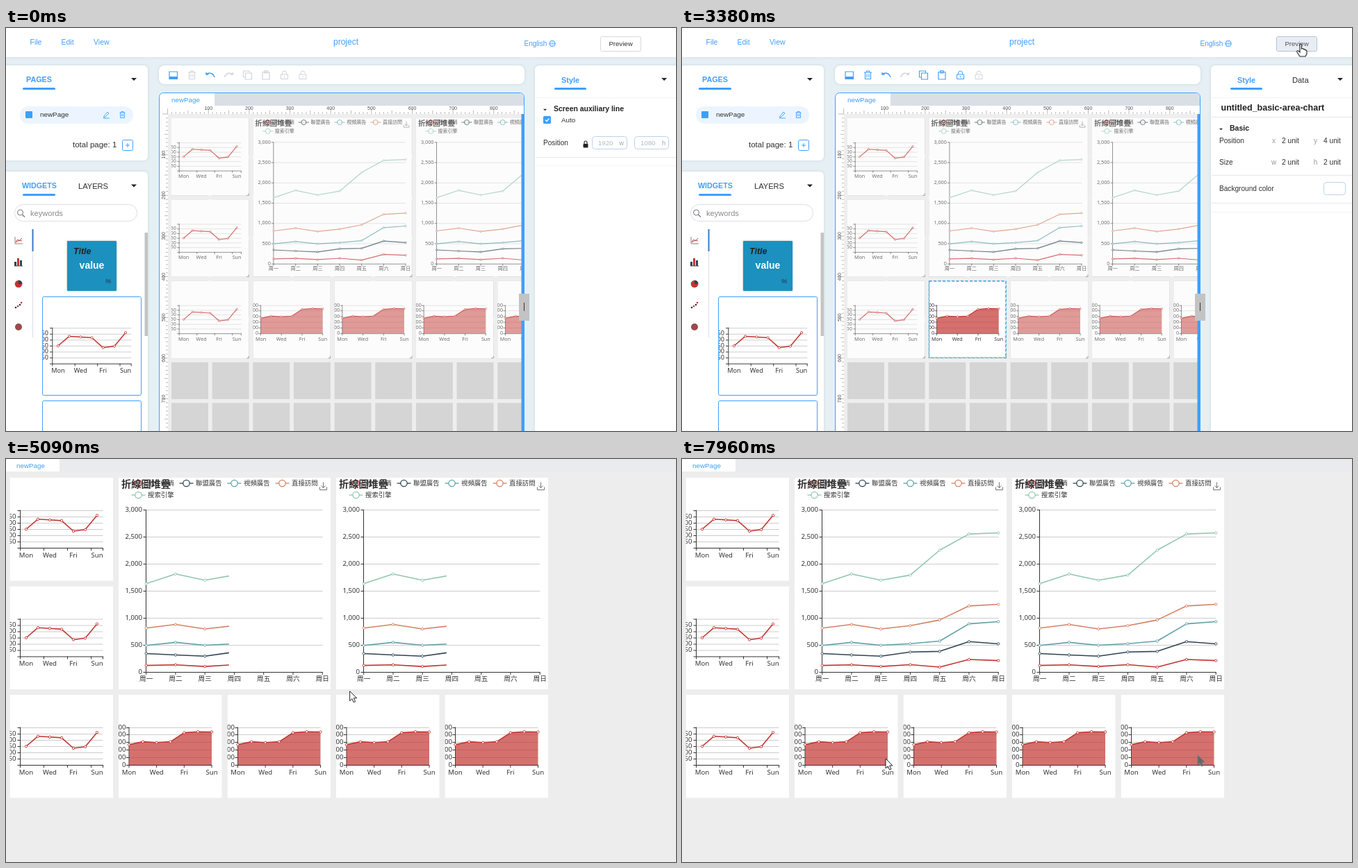
Write an HTML page with a canvas that moves like this. It is 964x581 px and loops after 8 s.

```html
<!DOCTYPE html>
<html lang="en">
<head>
<meta charset="utf-8">
<style>
html, body { margin: 0; width: 100%; height: 100%; overflow: hidden; background: #fff; }
canvas { display: block; }
</style>
</head>
<body>
<canvas id="stage" width="964" height="581"></canvas>
<script>
const g = document.getElementById('stage').getContext('2d');
const LOOP = 8000, BLUE = '#409eff', INK = '#303133', OFF = '#d0d3d8';
const UI = '"Liberation Sans", Arial, sans-serif';
const CHART = '"Noto Sans", "Noto Sans CJK TC", "Noto Sans CJK SC", sans-serif';
const COLORS = ['#c23531', '#2f4554', '#61a0a8', '#d48265', '#91c7ae'];
const NAMES = ['郵件營銷', '聯盟廣告', '視頻廣告', '直接訪問', '搜索引擎'];
const DAYS = ['Mon', '', 'Wed', '', 'Fri', '', 'Sun'];
const WEEK = [...'一二三四五六日'].map(d => '周' + d);
const WEEKLY = [150, 230, 224, 218, 135, 147, 260];
const SERIES = [
  [120, 132, 101, 134, 90, 230, 210],
  [220, 182, 191, 234, 290, 330, 310],
  [150, 232, 201, 154, 190, 330, 410],
  [320, 332, 301, 334, 390, 330, 320],
  [820, 932, 901, 934, 1290, 1330, 1320]
];
const STACKED = SERIES.map((_, k) =>
  WEEK.map((_, i) => SERIES.slice(0, k + 1).reduce((sum, s) => sum + s[i], 0)));
// kind, column, row
const CARDS = [
  ['line', 0, 0], ['line', 0, 2], ['line', 0, 4], ['stack', 2, 0], ['stack', 6, 0],
  ['area', 2, 4], ['area', 4, 4], ['area', 6, 4], ['area', 8, 4]
];
const MOVING = CARDS[5];
const CELL = 58.65, VIEW_CELL = 78.25, GX = 238, GY = 130;
// time, x, y
const PATH = [
  [70, 905, 172], [400, 640, 400], [600, 480, 560], [840, 384, 420], [940, 384, 420],
  [1000, 394, 476], [1250, 330, 504], [1400, 289, 485], [1680, 384, 422], [1830, 384, 422],
  [2210, 434, 370], [2600, 876, 18], [2680, 876, 18], [3000, 552, 310], [3380, 890, 23],
  [3700, 890, 23], [4470, 506, 336], [4700, 506, 336], [5320, 488, 334], [5470, 488, 334],
  [6250, 287, 233], [6330, 287, 233], [6600, 560, 200], [6850, 700, 230], [7100, 955, 420],
  [7170, 955, 420], [7400, 742, 427], [7750, 145, 425], [7960, 293, 432]
];

const clamp = v => Math.max(0, Math.min(1, v));

function cursorAt(t) {
  const i = PATH.findIndex(p => p[0] > t);
  if (i < 0) return PATH[PATH.length - 1].slice(1);
  if (i === 0) return null;
  const [t0, x0, y0] = PATH[i - 1], [t1, x1, y1] = PATH[i], k = (t - t0) / (t1 - t0);
  return [x0 + (x1 - x0) * k, y0 + (y1 - y0) * k];
}

function text(s, x, y, size, color = INK, align = 'left', style = '', family = UI) {
  g.font = `${style} ${size}px ${family}`;
  g.fillStyle = color;
  g.textAlign = align;
  g.textBaseline = 'middle';
  g.fillText(s, x, y + .5);
}
const label = (s, x, y, align = 'center', size = 9.6, color = '#333', style = '') =>
  text(s, x, y, size, color, align, style, CHART);

function rect(x, y, w, h, fill, r = 0, stroke) {
  g.beginPath();
  g.roundRect(x, y, w, h, r);
  if (fill) { g.fillStyle = fill; g.fill(); }
  if (stroke) { g.strokeStyle = stroke; g.lineWidth = 1; g.stroke(); }
}
function line(x0, y0, x1, y1, color, w = 1) {
  g.beginPath();
  g.moveTo(x0, y0);
  g.lineTo(x1, y1);
  g.strokeStyle = color;
  g.lineWidth = w;
  g.stroke();
}
function dot(x, y, r, fill, stroke, w = 1) {
  g.beginPath();
  g.arc(x, y, r, 0, 7);
  if (fill) { g.fillStyle = fill; g.fill(); }
  if (stroke) { g.strokeStyle = stroke; g.lineWidth = w; g.stroke(); }
}
function shape(d, x, y, fill, stroke, w = 1, flip = 1) {
  const p = new Path2D(d);
  g.save();
  g.translate(x, y);
  g.scale(flip, 1);
  if (fill) { g.fillStyle = fill; g.fill(p); }
  if (stroke) { g.strokeStyle = stroke; g.lineWidth = w; g.stroke(p); }
  g.restore();
}
const caret = (x, y, s = 4) => shape(`M${-s} ${-s / 2}H${s}L0 ${s / 2}Z`, x, y, '#222');
function panel(x, y, w, h, r = 6) {
  g.save();
  g.shadowColor = 'rgba(90,120,140,.2)';
  g.shadowBlur = 4;
  rect(x, y, w, h, '#fff', r);
  g.restore();
}

function plot(pts, color, reveal, base) {
  g.save();
  g.beginPath();
  g.rect(-5, 0, 10 + 300 * reveal, 310);
  g.clip();
  g.beginPath();
  pts.forEach(p => g.lineTo(...p));
  g.strokeStyle = color;
  g.lineWidth = 1.6;
  g.lineJoin = 'round';
  g.stroke();
  if (base) {
    g.lineTo(pts[6][0], base);
    g.lineTo(pts[0][0], base);
    g.fillStyle = 'rgba(194,53,49,.7)';
    g.fill();
  }
  pts.forEach(p => dot(...p, 1.7, '#fff', color, .9));
  g.restore();
}

function axes(x0, x1, y0, y1, steps, format, labelX, ticks) {
  for (let i = 0; i <= steps; i++) {
    const y = Math.round(y1 - (y1 - y0) * i / steps) + .5;
    if (i) line(x0, y, x1, y, '#ccc');
    line(x0 - 4, y, x0, y, '#333');
    label(format(i), labelX, y - 1, 'right');
  }
  line(x0, y0, x0, y1 + .5, '#333');
  line(x0, y1 + .5, x1, y1 + .5, '#333');
  ticks.forEach(x => line(x, y1, x, y1 + 4, '#333'));
}

function smallChart(kind, reveal) {
  const area = kind === 'area', x0 = 15, x1 = 134, y0 = 46.5, y1 = 101;
  const data = area ? SERIES[4] : WEEKLY, max = area ? 1500 : 300;
  const px = i => area ? x0 + i * (x1 - x0) / 6 : x0 + (i + .5) * (x1 - x0) / 7;
  const ticks = area ? [0, 2, 4, 6].map(px) : [0, 2, 4, 6, 7].map(i => x0 + 17 * i);
  const format = area ? i => i ? (i * 300).toLocaleString('en-US') : '0'
                      : i => i % 6 ? String(i * 50) : '';
  axes(x0, x1, y0, y1, area ? 5 : 6, format, area ? 10.5 : 9, ticks);
  DAYS.forEach((d, i) => d && label(d, px(i), 111.5));
  plot(data.map((v, i) => [px(i), y1 + .5 - (y1 - y0) * v / max]), COLORS[0], reveal, area && y1);
}

const stackX = i => 39.7 + i * 42.25, stackY = v => 280 - v * .078;

function stackChart(reveal) {
  NAMES.forEach((n, i) => {
    const x = 18.5 + i % 4 * 69, y = i < 4 ? 8 : 25;
    line(x, y, x + 20, y, COLORS[i], 1.3);
    dot(x + 10, y, 4.7, '#fff', COLORS[i], 1.3);
    label(n, x + 23.5, y - .5, 'left', 9.4);
  });
  label('折線圖堆疊', 4, 9.5, 'left', 14.2, '#333', 'bold');
  shape('M-5 1V5H5V1M0-6V2M-3-1L0 2L3-1', 294.5, 12.5, null, '#777', 1);
  axes(39.5, 293.5, 46, 280, 6, i => (i * 500).toLocaleString('en-US'), 34, WEEK.map((_, i) => stackX(i)));
  WEEK.forEach((d, i) => label(d, stackX(i), 289.5));
  STACKED.forEach((s, k) => plot(s.map((v, i) => [stackX(i), stackY(v)]), COLORS[k], reveal));
}

function card(kind, x, y, scale, alpha = 1, bg = '#fff', reveal = 1) {
  const size = kind === 'stack' ? 305 : 148.7;
  g.save();
  g.translate(x, y);
  g.scale(scale, scale);
  g.beginPath();
  g.rect(0, 0, size, size);
  g.clip();
  g.fillStyle = bg;
  g.fill();
  g.globalAlpha = alpha;
  kind === 'stack' ? stackChart(reveal) : smallChart(kind, reveal);
  g.restore();
}

function tooltip(mx, my) {
  const i = Math.max(0, Math.min(6, Math.round((mx - 39.7) / 42.25)));
  line(stackX(i), 46, stackX(i), 280, '#888', .8);
  STACKED.forEach((s, k) => dot(stackX(i), stackY(s[i]), 4.2, '#fff', COLORS[k], 1.2));
  const w = 88, h = 106;
  const x = mx + 23 + w > 305 ? mx - 20 - w : mx + 23;
  const y = my + 20 + h > 305 ? my - 19 - h : my + 20;
  rect(x, y, w, h, 'rgba(50,50,50,.7)', 3);
  label(WEEK[i], x + 3.5, y + 12, 'left', 10.6, '#fff');
  NAMES.forEach((n, k) => {
    const ty = y + 28.7 + k * 16.4;
    dot(x + 8, ty + .5, 4, COLORS[k]);
    label(`${n}: ${SERIES[k][i]}`, x + 15, ty, 'left', 10.5, '#fff');
  });
}

function header(cursor) {
  panel(0, 0, 964, 42, 0);
  text('File', 34.5, 20.5, 10.5, BLUE);
  text('Edit', 79.5, 20.5, 10.5, BLUE);
  text('View', 126, 20.5, 10.5, BLUE);
  text('project', 489, 20.5, 12, BLUE, 'center');
  text('English', 745.5, 22.5, 10, BLUE);
  dot(786, 22.5, 4.3, null, BLUE, .9);
  shape('M-4 0H4M0-4V4M-2-4Q-4 0-2 4M2-4Q4 0 2 4', 786, 22.5, null, BLUE, .6);
  const over = cursor && cursor[0] > 855 && cursor[0] < 914 && cursor[1] > 12 && cursor[1] < 33;
  rect(855.5, 12.5, 58, 21, over ? '#e8edf4' : '#fff', 2, over ? '#b9c3d0' : '#d5d8de');
  text('Preview', 884.5, 22.5, 9.6, over ? '#555' : INK, 'center');
  return over;
}

function leftSide() {
  panel(-6, 54, 210, 137);
  text('PAGES', 29, 74.5, 10.8, BLUE, 'left', 'bold');
  rect(24, 86, 47, 3, BLUE, 1.5);
  caret(184, 74);
  rect(20, 113, 163, 25, '#ecf5ff', 12);
  rect(28, 120, 10, 10, BLUE, 1);
  text('newPage', 49, 125, 9.9);
  shape('M-3 2L2-4L4-2L-1 3L-3.500 4ZM-4 5H5', 144, 125, null, BLUE, .9);
  shape('M-4-3H4M-3-3V4.500H3V-3M-1.500-3V-4.500H1.500V-3M-1-1V2.500M1-1V2.500', 167.500, 125, null, BLUE, .9);
  text('total page: 1', 96, 168.5, 11.5);
  rect(167.5, 161.5, 15, 15, '#fff', 2, BLUE);
  shape('M-3 0H3M0-3V3', 175, 169, null, BLUE);

  panel(-6, 207, 210, 390);
  text('WIDGETS', 23, 228, 10.7, BLUE, 'left', 'bold');
  rect(24, 239, 47, 3, BLUE, 1.5);
  text('LAYERS', 104, 228, 11.1);
  caret(184, 227.5);
  rect(12.5, 254.5, 176, 24, '#fff', 12, '#dcdfe6');
  dot(20.5, 266, 4, null, '#777');
  line(23.5, 269, 27, 272.5, '#777', 1.2);
  text('keywords', 35, 267.5, 11.1, '#888');

  line(38.5, 290, 38.5, 446, '#dcdfe6');
  line(38.5, 290, 38.5, 322, '#3a78c0', 2);
  shape('M-5-5V5H6', 18, 306, null, '#888');
  shape('M-4 2L-1-1L1 1L5-3M-4 3L1 0L5 1', 18, 306, null, COLORS[0], .9);
  [[12, 6], [16, 11], [20, 8]].forEach(([x, h], i) => rect(x, 343 - h, 3, h, i % 2 ? COLORS[0] : '#2f4554'));
  rect(12, 342.5, 12, 1, '#444');
  dot(18, 369, 5.3, COLORS[0]);
  shape('M0 0V-5.500A5.500 5.500 0 0 1 5.500 0Z', 18, 369, '#2f4554');
  [[14, 403], [17, 401], [20, 399], [22, 396]].forEach(([x, y], i) => dot(x, y, 1.3, i % 2 ? COLORS[0] : '#333'));
  dot(18, 431, 5, '#9c4a4a');

  g.save();
  g.shadowColor = 'rgba(0,0,0,.3)';
  g.shadowBlur = 3;
  rect(88, 307, 71, 72, '#1c90bf', 1);
  g.restore();
  text('Title', 97, 322, 12.5, '#222', 'left', 'italic bold');
  text('value', 123.5, 343, 14, '#fff', 'center', 'bold');
  text('%', 147, 364.5, 9.5, '#234', 'center', 'italic');
  card('line', 52.5, 387.5, .953);
  rect(52.5, 387.5, 142, 142, null, 2, BLUE);
  rect(52.5, 537.5, 142, 142, '#fff', 2, BLUE);
  rect(199.5, 295, 4.5, 149, '#c4c4c4');
}

function toolbar(active) {
  panel(220, 54, 526, 27, 8);
  const on = active ? BLUE : OFF, y = 68;
  shape('M-5.500-5H6V5.500H-5.500Z', 240.500, y, null, BLUE, 1.2);
  shape('M-5.500 2H6V5.500H-5.500Z', 240.500, y, BLUE);
  shape('M-5.500-4H5.500M-4-4V5.500H4V-4M-2-4V-6H2V-4M-1.500-1.500V3M1.500-1.500V3', 267.500, y, null, on, 1.1);
  const turn = 'M-6-1C-3-4 4-4 6 3M-6-4V-1H-2.500';
  shape(turn, 294, y, null, BLUE, 1.4);
  shape(turn, 320.5, y, null, OFF, 1.3, -1);
  shape('M-3-3H6V6H-3ZM-3 3H-6V-6H3V-3', 347.500, y, null, on, 1.1);
  shape('M-5-4.500H5V6H-5ZM-2-6.500H2V-3H-2Z', 374, y, null, on, 1.2);
  const lock = 'M-5-1H5V5.500H-5ZM-3-1V-3A3 3 0 0 1 3-3';
  shape(lock + 'V-1M0 1V3.500', 400.500, y, null, on);
  shape(lock + 'M0 1V3.500', 427, y, null, OFF);
}

function rulers() {
  for (let k = 0; k < 90; k++) {
    const p = k * CELL / 10, long = k % 10 ? (k % 5 ? 3 : 5) : 8;
    if (p < 510) line(232.6 + p, 124, 232.6 + p, 124 - long, '#aaa', .8);
    if (p < 457) line(233, 124 + p, 233 - long, 124 + p, '#aaa', .8);
    if (k === 0 || k % 10) continue;
    text(k * 10, 232.6 + p, 116, 7, '#555', 'center');
    g.save();
    g.translate(226.5, 124 + p);
    g.rotate(-Math.PI / 2);
    text(k * 10, 0, 0, 7, '#555', 'center');
    g.restore();
  }
}

function dashed(x, y) {
  g.setLineDash([4, 2.5]);
  rect(x, y, 111, 111, null, 0, '#35a7d3');
  rect(x + .5, y + .5, 110, 110, null, 0, '#35a7d3');
  g.setLineDash([]);
}

function workspace(active, drag, unit) {
  rect(220.5, 93.5, 525, 500, '#fff', 6, BLUE);
  rect(300, 94, 445, 18, '#dadfe6', [0, 5, 0, 0]);
  text('newPage', 258.5, 103.5, 9.9, BLUE, 'center');
  rulers();
  g.save();
  g.beginPath();
  g.rect(233, 124, 509, 457);
  g.clip();
  rect(233, 124, 509, 457, '#eee');
  for (let c = 0; c < 9; c++)
    for (let r = 0; r < 8; r++) rect(GX + c * CELL, GY + r * CELL, 53, 53, '#d5d5d5');
  for (const item of CARDS) {
    const [kind, c, r] = item, x = GX + c * CELL, y = GY + r * CELL;
    const picked = active && item === MOVING;
    if (picked && drag) continue;
    card(kind, x, y, .7495, picked ? 1 : .7, picked ? '#fff' : '#fcfcfc');
    const e = (kind === 'stack' ? 4 : 2) * CELL - 9;
    shape('M3 0V3H0', x + e, y + e, null, '#999', .9);
    if (picked) dashed(x, y);
  }
  if (drag) {
    rect(GX + unit[0] * CELL, GY + unit[1] * CELL, 111, 111, 'rgba(150,185,210,.8)');
    card('area', ...drag, .7495, .8, '#fafcfd');
    dashed(...drag);
  }
  g.restore();
  rect(741.5, 124, 4, 457, BLUE);
  rect(738, 383, 15, 39, '#c3c3c3');
  line(745.5, 396, 745.5, 408, '#333');
}

function inspector(active, unit) {
  panel(761, 54, 210, 540, 6);
  text('Style', 799, 75, 10.9, BLUE, 'left', 'bold');
  rect(789, 86, 46, 3, BLUE, 1.5);
  caret(947, 74);
  const rule = (y, c = '#e4e7ed') => line(762, y + .5, 964, y + .5, c);
  rule(100, '#f0f2f5');
  if (!active) {
    caret(775.5, 118, 2.5);
    text('Screen auxiliary line', 788, 116.5, 10.45, '#222', 'left', 'bold');
    rect(773, 127, 11, 11, BLUE, 1.5);
    shape('M-2.500 0L-.5 2L3-2', 778.500, 132.500, null, '#fff', 1.3);
    text('Auto', 799, 133, 9.8);
    text('Position', 773, 166, 10.1);
    rect(830.5, 167, 7, 5.5, '#222', 1);
    shape('M-2 0V-2A2 2 0 0 1 2-2V0', 834, 167, null, '#222', 1.1);
    [[843.5, 50, '1920', 'w'], [904.5, 49, '1080', 'h']].forEach(([x, w, value, unitName]) => {
      rect(x, 156.5, w, 18, '#fff', 4, '#b9d3ee');
      text(value, x + 8.5, 166, 9.6, '#b5b8be');
      text(unitName, x + 42, 166, 9.6, '#a5a8ae', 'center');
    });
    rule(186);
    rule(198, '#f3f5f7');
    return;
  }
  text('Data', 878, 75, 11.2);
  text('untitled_basic-area-chart', 775.5, 115.5, 12.5, '#222', 'left', 'bold');
  rule(128);
  caret(775.5, 146, 2.5);
  text('Basic', 788, 144.5, 10.5, '#222', 'left', 'bold');
  const row = (name, y, fields) => {
    text(name, 773, y, 10.1);
    fields.forEach(([k, v], i) => {
      text(k, 851.5 + i * 60, y, 10, '#999', 'center');
      text(v + ' unit', 863 + i * 60, y, 10.2);
    });
  };
  row('Position', 162.5, [['x', unit[0]], ['y', unit[1]]]);
  row('Size', 194, [['w', 2], ['h', 2]]);
  rule(212);
  text('Background color', 773, 232, 10.1);
  rect(923.5, 222.5, 31, 18, '#fff', 4, '#b9d3ee');
  rule(252);
  rule(265, '#f3f5f7');
}

const ARROW = 'M0 0V14L3.300 11L5.600 16L8 15L5.700 10H10Z';
const arrow = (x, y, fill = '#fff', edge = '#222') => shape(ARROW, x, y, fill, edge, 1);
function moveCursor(x, y, pressed) {
  if (pressed) dot(x, y, 10, 'rgba(250,220,40,.85)');
  shape('M0-8.500L3-5.500H1V-1H5.500V-3L8.500 0L5.500 3V1H1V5.500H3L0 8.500L-3 5.500H-1V1H-5.500V3L-8.500 0L-5.500-3V-1H-1V-5.500H-3Z',
    x, y, pressed ? '#ffe95c' : '#fff', pressed ? '#5d5200' : '#222');
}
const hand = (x, y) =>
  shape('M-1 1Q0-1 1.500 1V7Q4 5.500 4.500 8Q6.500 7 7 9Q9 8.500 9 11V14L7 18H-1L-5 12Q-6 9-3 10L-1 12Z', x, y, '#fff', '#222', 1.1);

function editor(t, cursor) {
  const active = t >= 940;
  let drag = null, unit = [2, 4];
  if (active && t < 1700) {
    drag = [cursor[0] - 384 + GX + 2 * CELL + .5, cursor[1] - 420 + GY + 4 * CELL + .5];
    unit = [Math.max(0, Math.round((drag[0] - GX) / CELL)), Math.round((drag[1] - GY) / CELL)];
  }
  rect(0, 0, 964, 581, '#e6f0f4');
  const over = header(cursor);
  leftSide();
  toolbar(active);
  workspace(active, drag, unit);
  inspector(active, unit);
  if (!cursor) return;
  const [x, y] = cursor;
  if (over) hand(x, y);
  else if (x > 238 && x < 738 && y > 130 && y < 476 || drag) moveCursor(x, y, t > 800 && t < 1700);
  else arrow(x, y);
}

function viewer(t, cursor) {
  const reveal = clamp((t - 4850) / 470), veil = 1 - clamp((t - 4780) / 150);
  rect(0, 0, 964, 581, '#ededed');
  rect(0, 0, 964, 18, '#e9ebef');
  rect(0, 0, 77, 18, '#fff');
  text('newPage', 15, 9.5, 9.8, BLUE);
  const [mx, my] = cursor;
  if (t > 4780) {
    for (const [kind, c, r] of CARDS) card(kind, 5.5 + c * VIEW_CELL, 27 + r * VIEW_CELL, 1, 1, '#fff', reveal);
    for (const c of [2, 6]) {
      const x = 5.5 + c * VIEW_CELL, y = 27;
      if (t < 5470 || mx < x + 39 || mx > x + 294 || my < y + 46 || my > y + 280) continue;
      g.save();
      g.translate(x, y);
      tooltip(mx - x, my - y);
      g.restore();
    }
  }
  if (veil) {
    g.globalAlpha = veil;
    rect(0, 0, 964, 581, 'rgba(19,19,32,.7)');
    [477, 492.8, 508.5].forEach(x => dot(x, 379, 4, '#fff'));
    g.globalAlpha = 1;
  }
  if (t >= 7400) arrow(742, 427, '#666', '#777');
  arrow(mx, my);
}

function draw(now) {
  const t = now % LOOP, cursor = cursorAt(t);
  g.clearRect(0, 0, 964, 581);
  t < 3700 ? editor(t, cursor) : viewer(t, cursor);
  requestAnimationFrame(draw);
}
requestAnimationFrame(draw);
</script>
</body>
</html>
```
